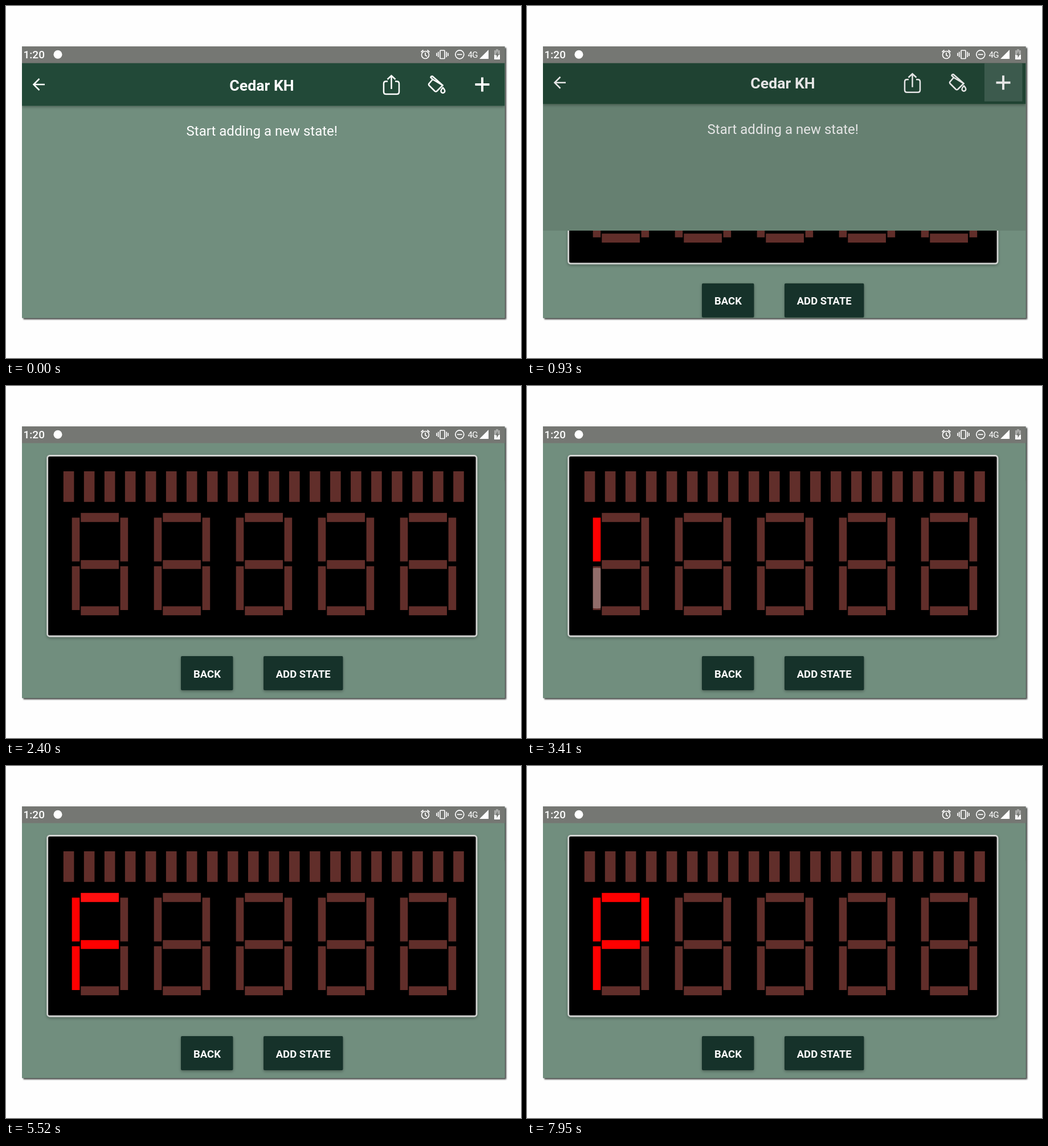
Write an HTML page that moves like this. It is 904 by 619 pixels and loops after 8000 ms.

```html
<!DOCTYPE html>
<html lang="en">
<head>
<meta charset="utf-8">
<title>Segment display editor</title>
<style>
  html, body { margin: 0; width: 100%; height: 100%; overflow: hidden; background: #fefefe; }
  svg { display: block; width: 100%; height: 100%; }
  text { font-family: Roboto, "Open Sans", sans-serif; fill: #fff; }
  .icon { fill: none; stroke: #fff; stroke-width: 2.5; }
  .button { font-size: 18.5px; font-weight: 700; text-anchor: middle; }
</style>
</head>
<body>
<svg viewBox="0 0 904 619">
  <defs>
    <filter id="cast" x="-5%" y="-5%" width="110%" height="110%">
      <feDropShadow dx="2.5" dy="2.5" stdDeviation="1.2" flood-color="#000" flood-opacity=".75"/>
    </filter>
    <filter id="lift" x="-10%" y="-10%" width="120%" height="130%">
      <feDropShadow dx="0" dy="2" stdDeviation="2.5" flood-color="#000" flood-opacity=".32"/>
    </filter>
    <clipPath id="content"><rect x="28" y="100" width="847.5" height="448.5"/></clipPath>
    <clipPath id="reveal"><rect id="revealBox" x="28" y="100" width="847.5" height="448.5"/></clipPath>
    <clipPath id="addBox"><rect x="803" y="104" width="66.5" height="67"/></clipPath>
  </defs>

  <rect x="28" y="71" width="847.5" height="477.5" fill="#718e7e" filter="url(#cast)"/>

  <g clip-path="url(#content)">
    <g id="home">
      <rect x="28" y="100" width="847.5" height="470" fill="#718e7e"/>
      <rect x="28" y="98" width="847.5" height="77.5" fill="#244a38" filter="url(#lift)"/>
      <circle id="addRipple" cx="836" cy="138" fill="#fff" clip-path="url(#addBox)"/>
      <path class="icon" d="M68 138H49M58.5 128L48.5 138L58.5 148"/>
      <text x="449" y="148.5" font-size="26.7" font-weight="700" text-anchor="middle">Cedar KH</text>
      <path class="icon" d="M670 132.5H667Q663 132.5 663 136.500V151Q663 155 667 155H686Q690 155 690 151V136.500Q690 132.5 686 132.5H683M676.500 146V123M669.500 129L676.500 122.500L683.500 129"/>
      <g class="icon" stroke-width="2" stroke-linejoin="round" stroke-linecap="round">
        <path d="M749 129L742.500 136.500Q741.500 138 742.500 139.500L753 150Q754.500 151 756 150L766.500 139.500Z"/>
        <path d="M749 129L745.500 125.500Q746 123 748.500 123.500L766.500 139.500"/>
        <path d="M767 143.500Q763.500 147.500 763.500 149.500A3.300 3.300 0 0 0 770.300 149.500Q770.300 147.500 767 143.500Z"/>
      </g>
      <path class="icon" style="stroke-width:4" d="M823.500 138H848.500M836 125.500V150.500"/>
      <text x="449.300" y="228" font-size="24" text-anchor="middle">Start adding a new state!</text>
      <rect id="dim" x="28" y="98" width="847.5" height="472" opacity="0"/>
    </g>
  </g>

  <g id="editorClip" clip-path="url(#reveal)">
    <rect x="28" y="100" width="847.5" height="448.5" fill="#718e7e"/>
    <g id="editor">
      <rect x="72.700" y="122.500" width="753.300" height="317.500" rx="4" fill="#000" stroke="#d0d2d0" stroke-width="2.800" filter="url(#lift)"/>
      <g id="display" fill="#612e2a"></g>
      <g fill="#18302a" filter="url(#lift)">
        <rect x="307" y="475" width="91.500" height="60" rx="2"/>
        <rect x="452" y="475" width="139.500" height="60" rx="2"/>
      </g>
      <text class="button" x="353" y="512.5">BACK</text>
      <text class="button" x="521.700" y="512.5">ADD STATE</text>
    </g>
  </g>

  <rect x="28" y="71" width="847.5" height="29.500" fill="#757773"/>
  <text x="30.500" y="92" font-size="19" font-weight="500">1:20</text>
  <circle cx="91" cy="85.300" r="7.500" fill="#fff"/>
  <g class="icon" style="stroke-width:1.700">
    <circle cx="736" cy="86" r="6.500"/>
    <path d="M736 82V86.500L739 88.500M728.500 81L732.500 77.500M743.500 81L739.500 77.500"/>
    <rect x="762" y="78" width="8" height="14.500" rx="1"/>
    <path d="M758.800 80.500V90M756 82.500V88M773.200 80.500V90M776 82.500V88"/>
    <circle cx="796.300" cy="85.300" r="7.500"/>
    <path d="M792 85.300H800.600"/>
  </g>
  <text x="810.500" y="91" font-size="15" letter-spacing="-.6">4G</text>
  <path d="M847 77V93H831Z" fill="#fff"/>
  <path d="M857 78H860V76H864V78H867V86H857Z" fill="#a9aaa8"/>
  <path d="M857 86H867V94H857Z" fill="#fff"/>
  <path d="M863 79.500L859 86.500H861.500V91.500L865.500 84.500H863Z" fill="#757773"/>
</svg>

<script>
const LOOP = 8000, STEP = 75;
const OPEN_AT = 822, OPEN_MS = 425, FIRST_STEP = 785;
const TOP = 100, HEIGHT = 448;

const $ = id => document.getElementById(id);
const clamp = v => Math.min(1, Math.max(0, v));
const set = (el, attrs) => { for (const k in attrs) el.setAttribute(k, attrs[k]); };

function add(parent, tag, attrs) {
  const el = document.createElementNS("http://www.w3.org/2000/svg", tag);
  set(el, attrs);
  parent.append(el);
  return el;
}

// Segment boxes of the first digit: x, y, width, height
const SEGMENTS = {
  a: [131.3, 223.2, 66.7, 16],
  b: [200.6, 231.5, 13.6, 77],
  c: [200.6, 317, 13.6, 77],
  d: [131.3, 387.4, 66.7, 15.8],
  e: [115.7, 317, 13.6, 77],
  f: [115.7, 231.5, 13.6, 77],
  g: [131.3, 306.2, 66.7, 15.5]
};

// Taps: touch down, segment lights, ripple starts to fade
const TAPS = [
  { seg: "f", down: 2705, lit: 2935, up: 2960 },
  { seg: "e", down: 3290, lit: 3560, up: 3570 },
  { seg: "g", down: 4345, lit: 4570, up: 4595 },
  { seg: "a", down: 5125, lit: 5360, up: 5400 },
  { seg: "b", down: 6767, lit: 6930, up: 6995 }
];

const box = ([x, y, width, height]) => ({ x, y, width, height });
const display = $("display"), first = {};

for (let i = 0; i < 20; i++) {
  add(display, "rect", box([100.8 + i * 36.02, 150, 18.6, 53.8]));
}
for (let digit = 0; digit < 5; digit++) {
  for (const name in SEGMENTS) {
    const [x, ...rest] = SEGMENTS[name];
    const el = add(display, "rect", box([x + digit * 144, ...rest]));
    if (!digit) first[name] = el;
  }
}
for (const tap of TAPS) {
  const [x, y, w, h] = SEGMENTS[tap.seg];
  const clip = add(display, "clipPath", { id: "seg-" + tap.seg });
  add(clip, "rect", box(SEGMENTS[tap.seg]));
  tap.ripple = add(display, "circle", {
    cx: x + w / 2, cy: y + h / 2, fill: "#fff", "clip-path": `url(#seg-${tap.seg})`
  });
}

function drawRipple(el, t, w, h, alpha, down, up) {
  const grow = 1 - (1 - clamp((t - down) / 225)) ** 2;
  const start = Math.max(w, h) * 0.3, end = Math.hypot(w, h) / 2;
  const shown = clamp((t - down) / 75) * (1 - clamp((t - up) / 150));
  set(el, { r: start + (end - start) * grow, opacity: alpha * shown });
}

// cubic-bezier(.2083, .82, .25, 1), solved for x by bisection
function ease(x) {
  if (x <= 0 || x >= 1) return clamp(x);
  const curve = (p, q, s) => 3 * p * s * (1 - s) ** 2 + 3 * q * s * s * (1 - s) + s ** 3;
  let lo = 0, hi = 1;
  for (let i = 0; i < 24; i++) {
    const mid = (lo + hi) / 2;
    if (curve(0.2083, 0.25, mid) < x) lo = mid; else hi = mid;
  }
  return curve(0.82, 1, lo);
}

function draw(t) {
  // The screen change moves in even steps
  const held = FIRST_STEP + STEP * Math.floor((t - FIRST_STEP) / STEP);
  const p = ease((held - OPEN_AT) / OPEN_MS), left = 1 - p;
  const y = TOP + HEIGHT * left;
  set($("home"), { transform: `translate(0 ${-9.5 * p})` });
  set($("dim"), { opacity: 0.1 * clamp(p * 3) });
  set($("editorClip"), { visibility: p > 0 ? "visible" : "hidden" });
  set($("revealBox"), { y, height: TOP + HEIGHT + 0.5 - y });
  set($("editor"), { transform: `translate(0 ${19.5 * left})` });

  drawRipple($("addRipple"), t, 66.5, 67, 0.15, 65, LOOP);
  for (const { seg, down, lit, up, ripple } of TAPS) {
    const [, , w, h] = SEGMENTS[seg];
    set(first[seg], { fill: t >= lit ? "#f00" : "#612e2a" });
    drawRipple(ripple, t, w, h, 0.3, down, up);
  }
}

const began = performance.now();
function tick() {
  draw((performance.now() - began) % LOOP);
  requestAnimationFrame(tick);
}
tick();
</script>
</body>
</html>
```
